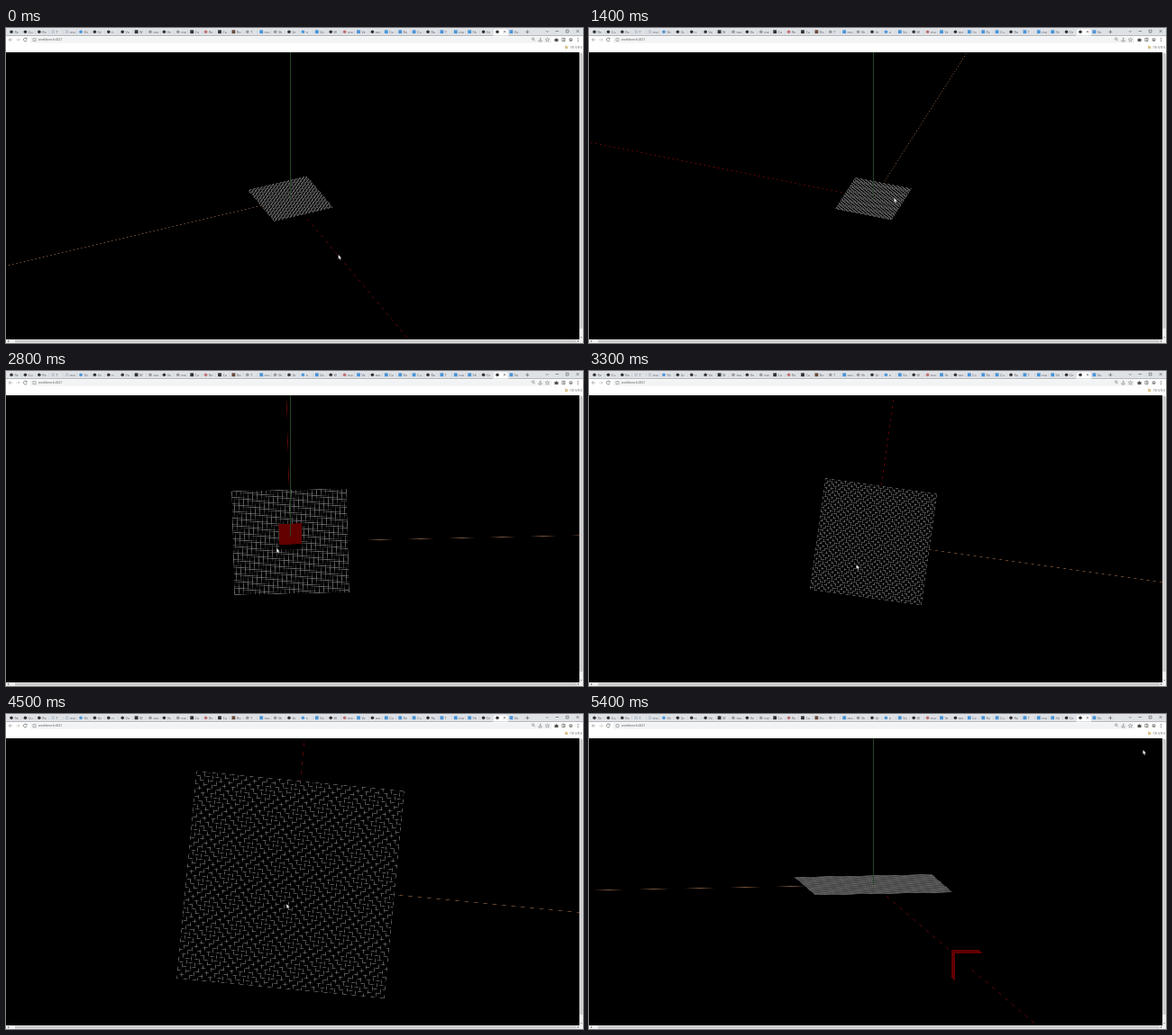
Write an HTML page with a canvas that moves like this. It is 640 px wide and 350 px high and loops after 5500 ms.

```html
<!DOCTYPE html>
<html lang="en">
<head>
<meta charset="utf-8">
<title>Orbiting grid</title>
<style>
  html, body { margin: 0; width: 100%; height: 100%; overflow: hidden; background: #000; }
  canvas, svg { position: absolute; left: 0; top: 0; width: 640px; height: 350px; display: block; }
  text { font-family: "Noto Sans", "Noto Sans CJK KR", "Noto Sans CJK", sans-serif; }
</style>
</head>
<body>
<canvas id="view" width="640" height="350"></canvas>
<svg id="ui" viewBox="0 0 640 350" xmlns="http://www.w3.org/2000/svg"></svg>
<script>
const LOOP = 5500, STEP = 100, SS = 3;
const CX = 315.5, CY = 189.7, CELLS = 50, CUBE = 0.1;
const RED = '#620000', GRID = '#686868';
const AXIS_A = '#80583e', AXIS_B = '#6c0808', AXIS_UP = '#264626';

// time, azimuth (deg), elevation (deg), grid side (px)
const camera = [
  [0, 156, 32.1, 71.2],
  [700, 209.8, 27, 55.3],
  [2100, 348.2, 47.3, 87.9],
  [2800, 358.6, 64.8, 127],
  [3300, 368, 90, 124.5],
  [4500, 365.5, 90, 231],
  [5200, 171.4, 7.5, 153.7],
  [5400, 171.4, 7.5, 153.7]
];
// time, x, y
const pointer = [
  [0, 368.6, 251.8],
  [700, 351.4, 221.8],
  [2100, 324.2, 169.4],
  [2800, 300.2, 196.8],
  [3300, 296.6, 215],
  [4500, 311.2, 211],
  [5100, 440, 138],
  [5400, 614.4, 39.8]
];

// Monotone cubic through the keys of one column
function track(keys, col, t) {
  const last = keys.length - 1;
  if (t >= keys[last][0]) return keys[last][col];
  let i = 0;
  while (t >= keys[i + 1][0]) i++;
  const slope = k => (keys[k + 1][col] - keys[k][col]) / (keys[k + 1][0] - keys[k][0]);
  const tangent = k => {
    if (k === 0) return slope(0);
    if (k === last) return slope(last - 1);
    const a = slope(k - 1), b = slope(k);
    return a * b <= 0 ? 0 : 2 * a * b / (a + b);
  };
  const d = keys[i + 1][0] - keys[i][0], u = (t - keys[i][0]) / d, v = 1 - u;
  return v * v * (1 + 2 * u) * keys[i][col] + u * u * (3 - 2 * u) * keys[i + 1][col]
    + d * u * v * (v * tangent(i) - u * tangent(i + 1));
}

const screen = document.getElementById('view').getContext('2d');
const big = document.createElement('canvas');
big.width = 640 * SS;
big.height = 350 * SS;
const ctx = big.getContext('2d');
ctx.scale(SS, SS);

function trace(points) {
  ctx.beginPath();
  points.forEach(p => ctx.lineTo(p[0], p[1]));
}
function line(from, to, color) {
  trace([from, to]);
  ctx.strokeStyle = color;
  ctx.stroke();
}
function fill(points, color) {
  trace(points);
  ctx.closePath();
  ctx.fillStyle = color;
  ctx.fill();
}

function drawScene(t) {
  const az = track(camera, 1, t) * Math.PI / 180;
  const el = track(camera, 2, t) * Math.PI / 180;
  const size = track(camera, 3, t);
  const c = Math.cos(az), s = Math.sin(az), tilt = Math.sin(el), rise = Math.cos(el);
  const at = (a, b, h = 0) => [
    CX + size * (a * c + b * s),
    CY + size * ((a * s - b * c) * tilt - h * rise)
  ];
  const cubeB = 6.7 * Math.sin(1.494 * (t / 1000 - 0.7));

  function slab(low, high) {
    const b0 = cubeB - CUBE, b1 = cubeB + CUBE;
    const a = s > 0 ? CUBE : -CUBE;
    const b = c < 0 ? b1 : b0;
    fill([at(a, b0, low), at(a, b1, low), at(a, b1, high), at(a, b0, high)], a > 0 ? RED : '#000');
    fill([at(-CUBE, b, low), at(CUBE, b, low), at(CUBE, b, high), at(-CUBE, b, high)], '#000');
    if (high > 0) fill([at(-CUBE, b0, high), at(CUBE, b0, high), at(CUBE, b1, high), at(-CUBE, b1, high)], RED);
  }

  ctx.fillStyle = '#000';
  ctx.fillRect(0, 0, 640, 350);
  ctx.lineWidth = 1 / SS;

  slab(-CUBE, 0);
  line([CX, CY], at(40, 0), AXIS_A);
  line([CX, CY], at(0, 40), AXIS_B);

  const h = 0.5;
  fill([at(-h, -h), at(h, -h), at(h, h), at(-h, h)], '#000');
  for (let i = 0; i <= CELLS; i++) {
    const k = i / CELLS - h;
    line(at(k, -h), at(k, h), GRID);
    line(at(-h, k), at(h, k), GRID);
  }
  slab(0, CUBE);

  // The upright axis leaves the cube through its top face
  const foot = Math.abs(cubeB) < CUBE ? CUBE : 0;
  if (rise > 0.001) line(at(0, 0, foot), at(0, 0, 40), AXIS_UP);

  // Point sampling keeps the thin lines broken into dashes
  screen.imageSmoothingEnabled = false;
  screen.drawImage(big, 0, 0, 640, 350);
}

const ui = document.getElementById('ui');
function add(tag, attrs, label) {
  const el = document.createElementNS(ui.namespaceURI, tag);
  for (const k in attrs) el.setAttribute(k, attrs[k]);
  if (label) el.textContent = label;
  ui.appendChild(el);
  return el;
}
const box = (x, y, width, height, color) => add('rect', { x, y, width, height, fill: color });
const dot = (cx, cy, r, color) => add('circle', { cx, cy, r, fill: color });
const text = (x, y, size, label, color = '#666') => add('text', { x, y, 'font-size': size, fill: color }, label);
const stroke = (d, color = '#666', w = 0.7) => add('path', { d, stroke: color, 'stroke-width': w, fill: 'none' });

function drawTabs() {
  const tones = { k: '#333', b: '#4a95d8', g: '#999', r: '#c07070', n: '#6b4a3a', l: '#c4ccd2' };
  const kinds = 'kkkllbkkkkgkgkrkngbgkbbkrbkbbbkbbbkkb';
  const round = 'kkk..bkkk.gkg.r..g.gkb.kr.k...k...kk.';
  const labels = ['Re', 'T', 'Gr', 'W', 'me', 'Cu', 'mo', 'n', 'mo', 'Co', 'Ro', 'Sh', 'Vo', 'Ve'];
  [...kinds].forEach((kind, i) => {
    const x = 6 + i * 15.4;
    if (i === 35) add('path', { d: 'M539.5 8.5 Q541 8.5 541 6.5 V3 Q541 1.5 542.5 1.5 H555 Q556.5 1.5 556.5 3 V6.5 Q556.5 8.5 558 8.5 Z', fill: '#fff' });
    if (round[i] === '.') box(x - 1.9, 2.3, 3.8, 3.8, tones[kind]);
    else dot(x, 4.2, 1.8, tones[kind]);
    if (i === 35) stroke('M551.8 3 l2.4 2.4 m0 -2.4 l-2.4 2.4', '#555', 0.6);
    else text(x + 3.4, 5.6, 3.8, labels[(i * 5) % labels.length]);
    if (i < 34) box(x + 10.9, 2.5, 0.3, 4, '#b5b9be');
  });
  stroke('M576.4 4.3 h4 m-2 -2 v4');
}

function drawChrome() {
  box(0, 0, 640, 8.5, '#dee1e6');
  box(0, 8.5, 640, 18.5, '#fff');
  box(27, 9.8, 578, 6.8, '#f1f3f4');
  drawTabs();

  // Window buttons
  stroke('M599 3.2 l1.3 1.3 l1.3 -1.3');
  stroke('M609.6 3.5 h3.4');
  stroke('M621.2 2.2 h2.8 v2.8 h-2.8 z', '#555', 0.6);
  stroke('M632.6 2 l3 3 m0 -3 l-3 3');

  // Toolbar
  stroke('M7.2 13 h-4 m1.8 -1.8 l-1.8 1.8 l1.8 1.8', '#888', 0.6);
  stroke('M11.2 13 h4 m-1.8 -1.8 l1.8 1.8 l-1.8 1.8', '#bbb', 0.6);
  stroke('M22.8 11.8 a1.9 1.9 0 1 0 0.3 1.8 M23.1 10.8 v1.4 h-1.4');
  stroke('M30 11.6 h3 v3 h-3 z', '#888', 0.6);
  text(36, 14.4, 3.4, 'workbench:4321');
  stroke('M583.4 12 a1.2 1.2 0 1 0 2.4 0 a1.2 1.2 0 1 0 -2.4 0 M585.5 13 l1.2 1.3', '#777', 0.6);
  stroke('M591 13 v2 h3 v-2 M592.5 13.8 v-2.8 l1.4 1', '#777', 0.6);
  stroke('M600.5 10.8 l0.7 1.5 l1.6 0.1 l-1.2 1.1 l0.4 1.6 l-1.5 -0.9 l-1.5 0.9 l0.4 -1.6 l-1.2 -1.1 l1.6 -0.1 z', '#777', 0.5);
  add('path', { d: 'M608.5 12 h1.2 a0.8 0.8 0 0 1 1.6 0 h1.2 v3 h-4 z', fill: '#555' });
  stroke('M616.8 11.2 h3.2 v3.4 h-3.2 z M618.8 11.2 v3.4', '#555', 0.6);
  dot(626.5, 13, 2, '#888');
  dot(626.5, 12.5, 0.8, '#eee');
  [11.2, 13, 14.8].forEach(y => dot(634.5, y, 0.5, '#555'));
  add('path', { d: 'M620 19.6 h1.3 l0.5 0.6 h1.5 v2.9 h-3.3 z', fill: '#d9c58c' });
  text(625, 22.8, 2.9, '기타 북마크');

  // Scrollbars
  box(636, 27, 4, 323, '#f1f1f1');
  box(0, 346, 640, 4, '#f1f1f1');
  box(636.5, 30, 3, 304, '#c8c8c8');
  box(10, 346.6, 623, 2.8, '#c8c8c8');
  add('path', { d: 'M3.2 346.8 v2.4 l-1.6 -1.2 z M634 346.8 v2.4 l1.6 -1.2 z', fill: '#666' });
  add('path', { d: 'M636.9 29.4 h2.2 l-1.1 -1.4 z M636.9 343.2 h2.2 l-1.1 1.4 z', fill: '#777' });
}

drawChrome();
const arrow = add('path', {
  d: 'M0 0 V5 L1.1 4.1 L1.9 5.9 L2.8 5.5 L2 3.8 H3.6 Z',
  fill: '#fff', stroke: '#000', 'stroke-width': 0.25
});

const start = performance.now();
let shown = -1;
function frame(now) {
  const elapsed = Math.max(0, now - start) % LOOP;
  const t = Math.floor(elapsed / STEP) * STEP;
  if (t !== shown) {
    shown = t;
    drawScene(t);
    arrow.setAttribute('transform', `translate(${track(pointer, 1, t)} ${track(pointer, 2, t)})`);
  }
  requestAnimationFrame(frame);
}
frame(start);
</script>
</body>
</html>
```
